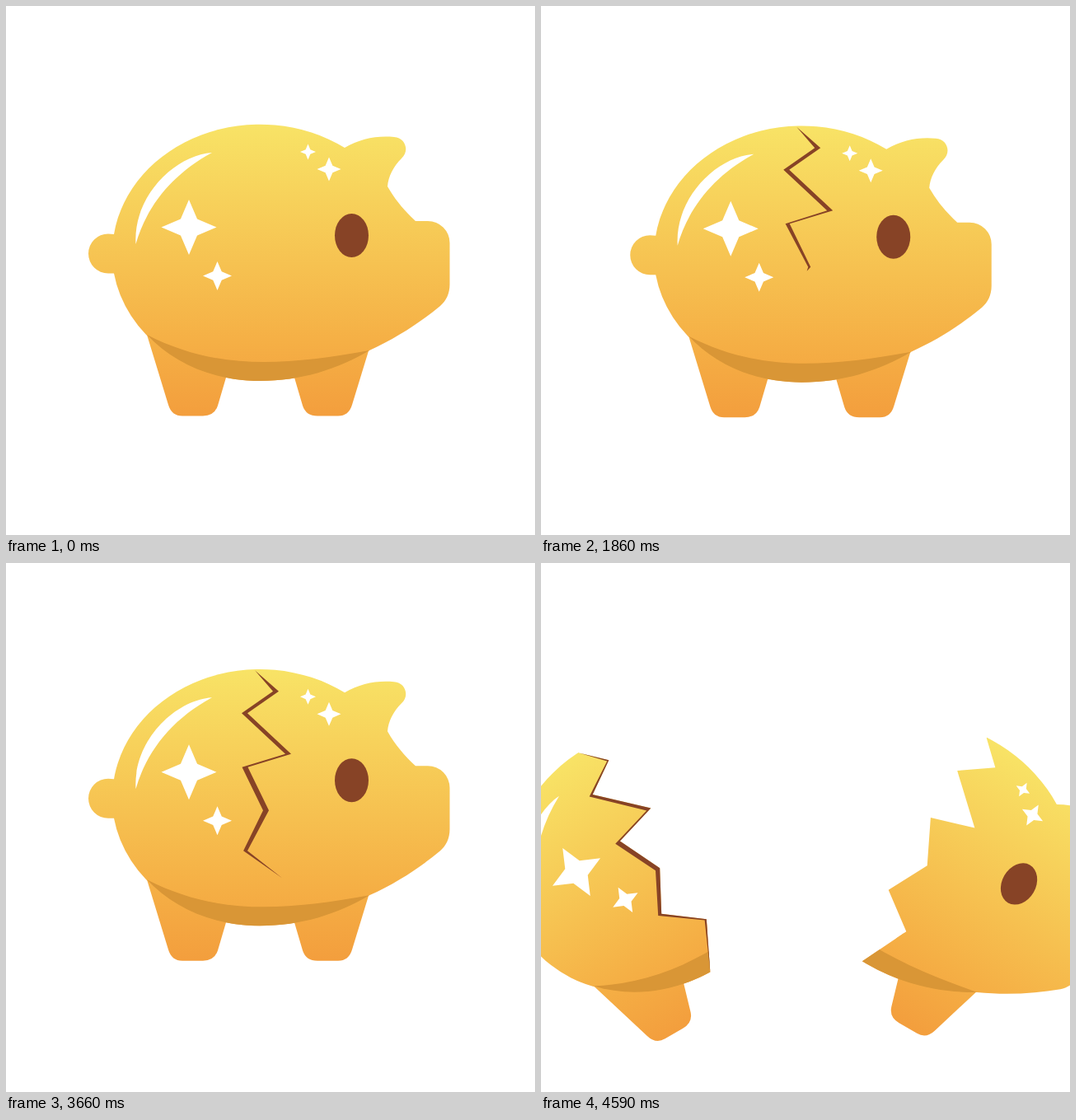
An HTML page that plays this animation: 642x642 px, repeating every 5850 ms.

```html
<!DOCTYPE html>
<html lang="en">
<head>
<meta charset="utf-8">
<title>Breaking piggy bank</title>
<style>
  html, body { margin: 0; width: 100%; height: 100%; overflow: hidden; background: #fff; }
  svg { display: block; width: 100%; height: 100%; }
</style>
</head>
<body>
<svg viewBox="0 0 642 642">
  <defs>
    <linearGradient id="gold" gradientUnits="userSpaceOnUse" x1="0" y1="144" x2="0" y2="498">
      <stop offset="0" stop-color="#f8e366"/>
      <stop offset=".75" stop-color="#f5af45"/>
      <stop offset="1" stop-color="#f39e3d"/>
    </linearGradient>
    <clipPath id="leftClip"><polygon id="leftArea"/></clipPath>
    <clipPath id="rightClip"><polygon id="rightArea"/></clipPath>
    <path id="star" fill="#fff" d="M0-1L.3-.3L1 0L.3 .3L0 1L-.3 .3L-1 0L-.3-.3Z"/>
    <path id="leg" d="M171 399L197 484Q201 497.500 214 497.500H239Q253 497.500 257 485L267 451L300 400Z"/>
    <g id="pig">
      <g fill="url(#gold)">
        <use href="#leg"/>
        <use href="#leg" transform="translate(617 0) scale(-1 1)"/>
        <path d="M131 277A179 155.500 0 0 1 411 172C430 161 450 157 471 159C485 160 490 176 480 185
          C470 195 464 207 463 219C472 235 484 249 497 261H512A26.500 26.500 0 0 1 538.500 287.500V338
          C538.500 349 534 358 527 364C503 384 474 403 441 418C402 441 358 455 308 455
          A179 155.500 0 0 1 131 324.500H124A24 24 0 0 1 124 276.500Z"/>
      </g>
      <path fill="#d99636" d="M171 399C255 442 335 437 441 418C402 441 358 455 308 455C252 455 204 434 171 399Z"/>
      <path fill="#fff" d="M250 178C205 181 154 231 157.500 289C170 245 200 205 250 178Z"/>
      <use href="#star" transform="translate(222 268.500) scale(33.500)"/>
      <use href="#star" transform="translate(256.500 327.500) scale(17.500)"/>
      <use href="#star" transform="translate(392 198) scale(14.500)"/>
      <use href="#star" transform="translate(366.500 177) scale(9.500)"/>
      <ellipse cx="419.500" cy="278.500" rx="20.500" ry="26.500" fill="#874326"/>
    </g>
  </defs>
  <g id="whole">
    <use href="#pig"/>
    <polygon id="crack" fill="#874326"/>
  </g>
  <g id="left">
    <g clip-path="url(#leftClip)"><use href="#pig"/></g>
    <polygon id="brokenEdge" fill="#874326"/>
  </g>
  <g id="right" clip-path="url(#rightClip)"><use href="#pig"/></g>
</svg>
<script>
const LOOP = 5850, STEP = 30, SHAKE = 360;
const BREAK = 3600, BREAK_TIME = 990, SPLIT_DELAY = 90;
const PIVOT = 321, CRACK_WIDTH = 7;

// Zigzag along which the pig breaks, from back to belly.
const zigzag = [[297, 145], [324, 170.5], [286, 197], [339, 246.5], [286.5, 262.5], [312, 315], [286, 364], [330, 397], [302, 454.5]];

// Each shake lengthens the crack to a position counted in zigzag corners.
const shakes = [
  { start: 690, x: 15, y: -9, crackEnd: 2.4 },
  { start: 1560, x: -19, y: -4, crackEnd: 5.1 },
  { start: 2610, x: 11, y: 14, crackEnd: 7 }
];

const el = id => document.getElementById(id);
const clamp = v => Math.min(1, Math.max(0, v));
const easeOut = (u, power) => 1 - (1 - u) ** power;
const smooth = u => u * u * (3 - 2 * u);
const show = (id, visible) => el(id).setAttribute('display', visible ? 'inline' : 'none');
const setPoints = (id, points) => el(id).setAttribute('points', points.join(' '));
const shiftX = (points, offset) => points.map(([x, y], i) => [x + offset(i), y]);
const move = (id, x, y, angle = 0) =>
  el(id).setAttribute('transform', `translate(${x} ${y}) rotate(${angle} ${PIVOT} ${PIVOT})`);

function setUpHalves() {
  const cutAcross = [[297, 0], ...zigzag, [302, 642]];
  setPoints('leftArea', [[-50, 0], ...cutAcross, [-50, 642]]);
  setPoints('rightArea', [[700, 0], ...cutAcross, [700, 642]]);
  const inner = shiftX(zigzag, i => -6.5 * Math.sin(Math.PI * i / 8));
  setPoints('brokenEdge', [...zigzag, ...inner.reverse()]);
}

function pointOnZigzag(pos) {
  const i = Math.floor(pos);
  return zigzag[i].map((v, axis) => v + (zigzag[i + 1][axis] - v) * (pos - i));
}

// The crack is pointed at both ends and thins out towards its tip.
function crackShape(end) {
  if (!end) return [];
  const corners = zigzag.slice(0, Math.ceil(end));
  const thickness = i => i && CRACK_WIDTH * Math.min(1, 0.4 + 0.3 * (end - i));
  const rightEdge = i => i ? CRACK_WIDTH : 5;
  const tip = shiftX([pointOnZigzag(end)], () => 5);
  const leftSide = shiftX(corners, i => rightEdge(i) - thickness(i));
  return [...shiftX(corners, rightEdge), ...tip, ...leftSide.reverse()];
}

function drawWhole(t, hop) {
  let x = 0, y = hop, end = 0;
  for (const shake of shakes) {
    const u = clamp((t - shake.start) / SHAKE);
    const swell = Math.sin(Math.PI * u);
    x += shake.x * swell * Math.sin(2 * Math.PI * u);
    y += shake.y * swell * Math.sin(4 * Math.PI * u);
    if (u >= 0.25) end = shake.crackEnd;
  }
  setPoints('crack', crackShape(end));
  move('whole', x, y);
}

function drawHalves(s, hop) {
  const u = clamp((s - SPLIT_DELAY) / (BREAK_TIME - SPLIT_DELAY));
  const angle = 30 * smooth(clamp((s - 40) / (BREAK_TIME - 40)));
  move('left', -166 * easeOut(u, 2.4), 50 * easeOut(u, 2.1) + hop, -angle);
  move('right', 152.5 * easeOut(u, 3.65), 56 * easeOut(u, 1.57) + hop, angle);
}

function render(now) {
  const t = Math.floor((now % LOOP) / STEP) * STEP;
  const s = t - BREAK;
  const hop = -17 * Math.sin(Math.PI * clamp(s / (2 * SPLIT_DELAY)));
  const broken = s > SPLIT_DELAY;
  show('whole', !broken);
  show('left', broken);
  show('right', broken);
  if (broken) drawHalves(s, hop);
  else drawWhole(t, hop);
}

const origin = performance.now();
function tick() {
  render(performance.now() - origin);
  requestAnimationFrame(tick);
}
setUpHalves();
tick();
</script>
</body>
</html>
```
